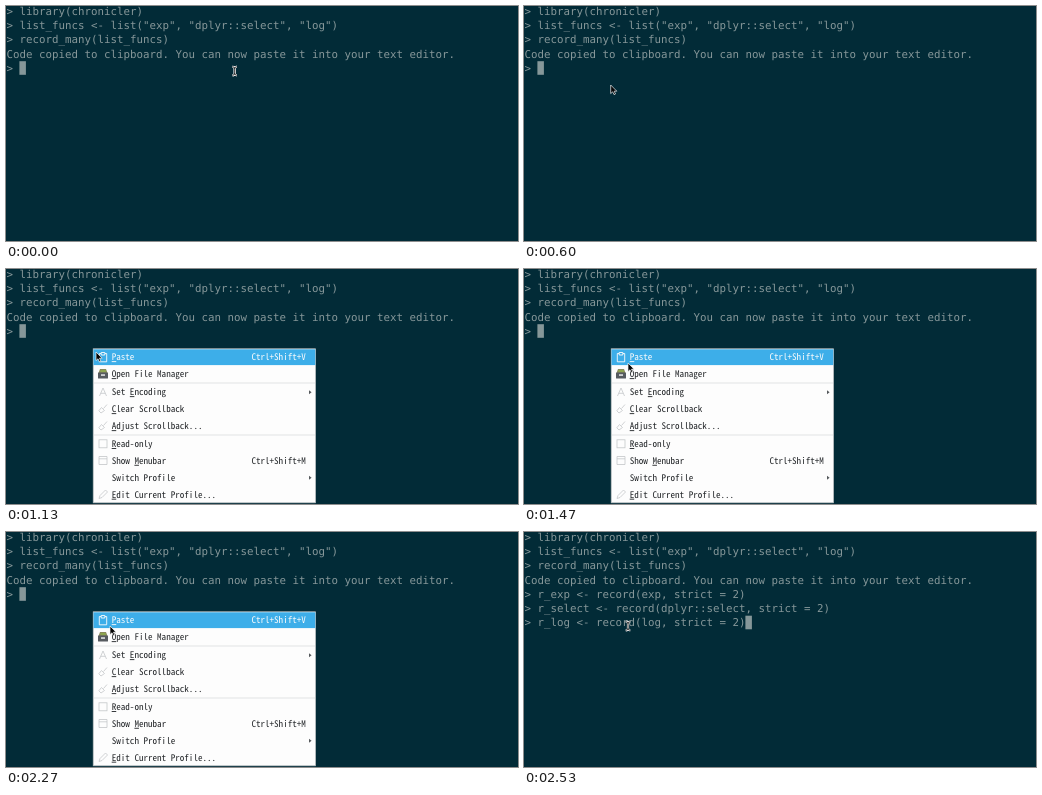
An HTML page for the animation above (2990 ms loop, 512 px wide and 235 px high).

```html
<!DOCTYPE html>
<html lang="en">
<head>
<meta charset="utf-8">
<title>Terminal paste</title>
<style>
html, body { margin: 0; width: 100%; height: 100%; overflow: hidden; background: #022b37; }
svg { display: block; width: 100%; height: 100%; }
text { white-space: pre; text-rendering: geometricPrecision; }
.term { font: 10.8px "DejaVu Sans Mono", "Noto Sans Mono", monospace; fill: #869799; }
.menu { font: 9.08px "Noto Sans Mono CJK JP", "Noto Sans CJK JP", "Noto Sans Mono", monospace; fill: #232629; }
.key { text-decoration: underline; text-decoration-thickness: .6px; }
</style>
</head>
<body>
<svg id="stage" viewBox="0 0 512 235">
  <rect width="512" height="235" fill="#022b37"/>
  <g id="lines" class="term"></g>
  <rect id="block" width="6.5" height="13.6" fill="#869799"/>
  <g id="menu" class="menu">
    <rect x="87.2" y="79.8" width="222.4" height="154" fill="#fdfdfd" stroke="#b9bdbf" stroke-width=".7"/>
    <rect id="hover" x="87.5" y="80.3" width="221.8" height="15.8" fill="#3daee9"/>
    <path d="M88 114H309M88 166H309" stroke="#d5d7d8" stroke-width=".7"/>
    <g id="clip" fill="none" stroke-width=".9">
      <path d="M95 84.5H93.3V92.8H100.7V84.5H99"/>
      <path d="M95.2 83.5H98.8V86H95.2Z"/>
    </g>
    <g>
      <path d="M92.5 104L94 100H100L101.5 104Z" fill="#8a8a5c"/>
      <path d="M94.5 102H99.8" stroke="#8fb24a" stroke-width="1.4"/>
      <rect x="92" y="103.5" width="10" height="6" rx=".6" fill="#565b60"/>
      <rect x="95" y="105.2" width="4" height="1.7" fill="#d8d9da"/>
    </g>
    <g fill="none" stroke="#c4c7c9" stroke-width=".8">
      <path d="M93.5 127L97 119L100.5 127M94.8 124.3H99.2"/>
      <path d="M101 135.5L97.5 139.5M95.5 138.5L98.5 141.5L95 144L92.8 141.8Z"/>
      <path d="M101 152.5L97.5 156.5M95.5 155.5L98.5 158.5L95 161L92.8 158.8Z"/>
      <rect x="93" y="170.8" width="8" height="8"/>
      <path d="M93 187.5H101V195.5H93ZM93 189.8H101"/>
      <path d="M93 229.5L94 226.5L99.5 221L101.5 223L96 228.5Z"/>
    </g>
    <path d="M303 121.2L305.6 123.2L303 125.2ZM303 206.7L305.6 208.7L303 210.7Z" fill="#55595c"/>
    <g id="items"></g>
  </g>
  <path id="arrow" d="M0 0V8.6L2 6.8L3.4 9.7L4.8 9L3.5 6.2H6.1Z" fill="#050505" stroke="#f4f4f4" stroke-width=".7" stroke-linejoin="round"/>
  <g id="beam" fill="none">
    <path id="bar" d="M-2.2 -4.2Q0 -4.2 0 -2.6Q0 -4.2 2.2 -4.2M-2.2 4.2Q0 4.2 0 2.6Q0 4.2 2.2 4.2M0 -3V3" stroke="#f4f4f4" stroke-width="2.1"/>
    <use href="#bar" id="core"/>
    <path d="M-2.2 -4.2Q0 -4.2 0 -2.6Q0 -4.2 2.2 -4.2M-2.2 4.2Q0 4.2 0 2.6Q0 4.2 2.2 4.2M0 -3V3" stroke="#080808" stroke-width=".8"/>
  </g>
</svg>
<script>
const LOOP = 2990, TICK = 200 / 3;
const CHAR = 6.5, ROW = 14.25, LEFT = 0.4;
const $ = id => document.getElementById(id);

function label(parent, x, y, str, mark = -1) {
  const el = document.createElementNS("http://www.w3.org/2000/svg", "text");
  el.setAttribute("x", x);
  el.setAttribute("y", y);
  if (mark < 0) el.textContent = str;
  else {
    const key = document.createElementNS(el.namespaceURI, "tspan");
    key.setAttribute("class", "key");
    key.textContent = str[mark];
    el.append(str.slice(0, mark), key, str.slice(mark + 1));
  }
  parent.append(el);
  return el;
}

const shown = [
  "> library(chronicler)",
  '> list_funcs <- list("exp", "dplyr::select", "log")',
  "> record_many(list_funcs)",
  "Code copied to clipboard. You can now paste it into your text editor.",
  "> "
];
const pasted = [
  "> r_exp <- record(exp, strict = 2)",
  "> r_select <- record(dplyr::select, strict = 2)",
  "> r_log <- record(log, strict = 2)"
];
const after = [...shown.slice(0, 4), ...pasted];
const rows = after.map((_, i) => label($("lines"), LEFT, 8.8 + i * ROW, ""));

// text, middle height, mnemonic index, shortcut
const items = [
  ["Paste", 88, 0, "Ctrl+Shift+V"],
  ["Open File Manager", 105, 0],
  ["Set Encoding", 123, 4],
  ["Clear Scrollback", 140, 0],
  ["Adjust Scrollback...", 157, 0],
  ["Read-only", 174.8, 0],
  ["Show Menubar", 191.6, 5, "Ctrl+Shift+M"],
  ["Switch Profile", 208.6, -1],
  ["Edit Current Profile...", 225.5, 0]
].map(([str, y, mark, keys]) => {
  const all = [label($("items"), 105.7, y + 3.2, str, mark)];
  if (keys) all.push(label($("items"), 245.4, y + 3.2, keys));
  return all;
});

const clamp = v => Math.max(0, Math.min(1, v));
const ease = v => v * v * (3 - 2 * v);
const mix = (a, b, v) => a + (b - a) * v;
const show = (el, on) => el.setAttribute("visibility", on ? "visible" : "hidden");

function pointer(k) {
  if (k < 16.5) {
    const p = clamp(k / 8);
    return [mix(228.7, 86.7, ease(p)), mix(65, 79, ease(p)) + 7 * Math.sin(Math.PI * p) * p];
  }
  const p = ease(clamp((k - 17) / 5));
  return [mix(90, 104, p), mix(83, 94, p)];
}

function draw(t) {
  const k = Math.floor((t + 8) / TICK);
  const done = k >= 36;
  const text = done ? after : shown;
  rows.forEach((el, i) => { el.textContent = text[i] || ""; });
  const last = text.length - 1;
  $("block").setAttribute("x", LEFT + text[last].length * CHAR);
  $("block").setAttribute("y", 55.2 + (last - 4) * ROW);

  show($("menu"), k >= 10 && !done);
  $("menu").setAttribute("opacity", k === 35 ? 0.5 : 1);
  const hot = k >= 17;
  $("hover").setAttribute("opacity", hot ? 1 : 0);
  $("clip").setAttribute("stroke", hot ? "#fcfcfc" : "#c4c7c9");
  items[0].forEach(el => el.setAttribute("fill", hot ? "#fcfcfc" : "#232629"));

  const [x, y] = pointer(k);
  const beam = k < 9 || k >= 37;
  const at = `translate(${x} ${y})`;
  $("beam").setAttribute("transform", at);
  $("arrow").setAttribute("transform", at);
  show($("beam"), beam);
  show($("arrow"), !beam);
}

const start = performance.now();
function frame() {
  draw((performance.now() - start) % LOOP);
  requestAnimationFrame(frame);
}
draw(0);
requestAnimationFrame(frame);
</script>
</body>
</html>
```
